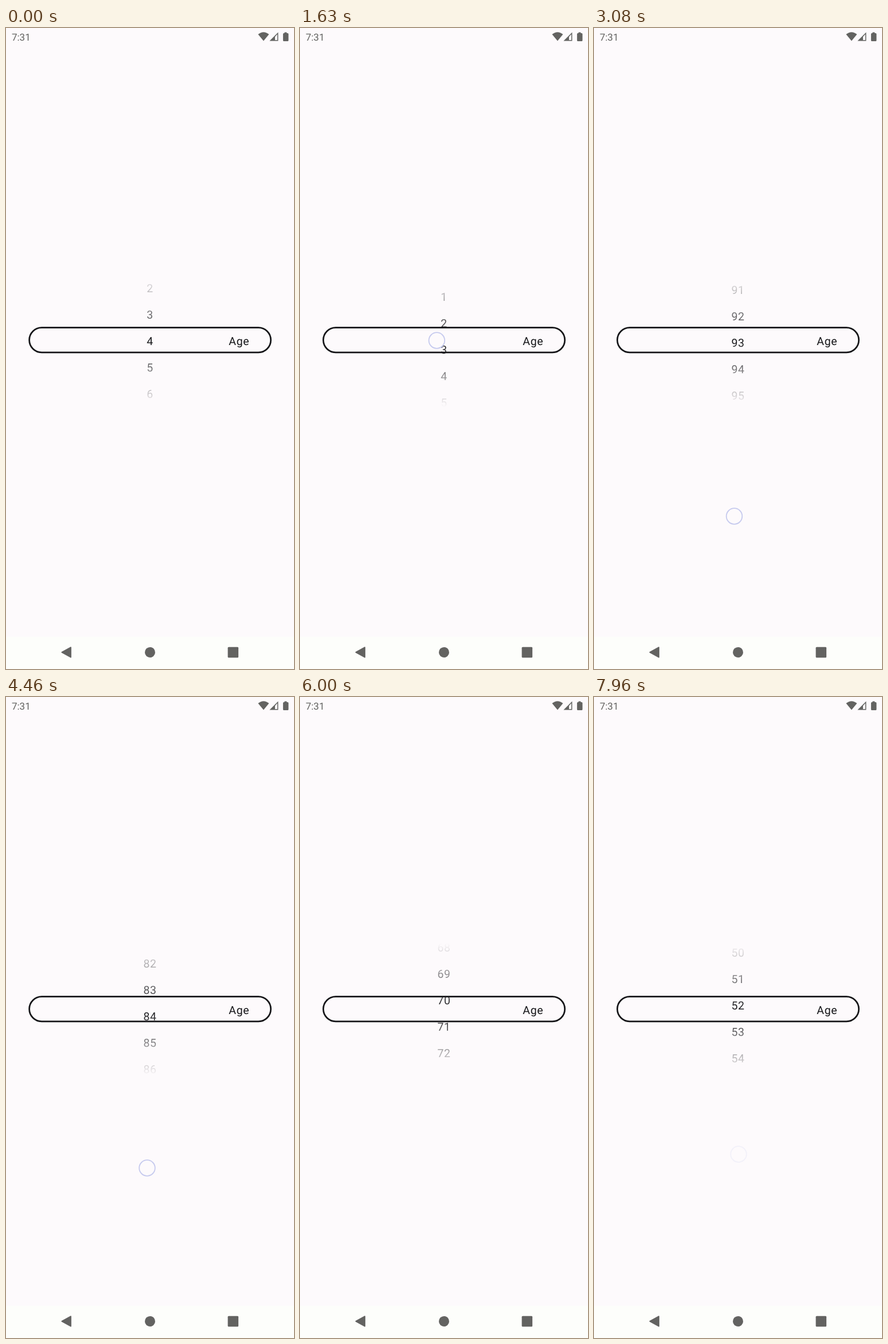
Animation of 502x1116 px, one loop 8000 ms. Source, as an HTML page:

```html
<!DOCTYPE html>
<html lang="en">
<head>
<meta charset="utf-8">
<title>Age picker</title>
<style>
  html, body { margin: 0; width: 100%; height: 100%; overflow: hidden; background: #fdfafc; }
  svg { display: block; width: 502px; height: 1116px; }
  text { font-family: Roboto, sans-serif; text-rendering: geometricPrecision; }
  .body { font-size: 19.5px; letter-spacing: .61px; fill: #151518; }
  .icons { fill: #636361; }
</style>
</head>
<body>
<svg viewBox="0 0 502 1116">
  <defs>
    <linearGradient id="fade" gradientUnits="userSpaceOnUse" x1="0" y1="429" x2="0" y2="660">
      <stop offset="0" stop-color="#fff" stop-opacity="0"/>
      <stop offset=".5" stop-color="#fff"/>
      <stop offset="1" stop-color="#fff" stop-opacity="0"/>
    </linearGradient>
    <mask id="window" maskUnits="userSpaceOnUse" x="0" y="429" width="502" height="231">
      <rect y="429" width="502" height="231" fill="url(#fade)"/>
    </mask>
  </defs>

  <rect y="1060" width="502" height="56" fill="#fdfefb"/>

  <g class="icons" transform="translate(.4 .4)">
    <text x="9.500" y="21.200" font-size="17">7:31</text>
    <path d="M448.500 22 439 10.600Q448.500 3 458 10.600Z"/>
    <path fill-rule="evenodd" d="M459 22 474 7V22ZM468.500 14.800V20.500H472.500V10.700Z"/>
    <path d="M485 8.500V7H489V8.500H490.500Q492 8.500 492 10V21Q492 22.500 490.500 22.500H484Q482.500 22.500 482.500 21V10Q482.500 8.500 484 8.500Z"/>
    <path d="M97 1086.500 112.500 1078V1095Z" stroke="#636361" stroke-width="2" stroke-linejoin="round"/>
    <circle cx="250.600" cy="1086.500" r="9"/>
    <rect x="386.200" y="1077.300" width="18.500" height="18.500" rx="1.500"/>
  </g>

  <g id="wheel" class="body" text-anchor="middle" mask="url(#window)"></g>
  <rect x="40.600" y="521.700" width="421" height="43.200" rx="21.600" fill="none" stroke="#151518" stroke-width="2.700"/>
  <text class="body" x="388.300" y="551.500">Age</text>
  <circle id="touch" r="13.800" fill="none" stroke="#c6caee" stroke-width="1.800"/>
</svg>
<script>
  const LOOP = 8000, GLIDE = 500, FADE = 200;
  const ROW = 46, BASELINE = 551.5, COUNT = 100, START = 4;

  // Each swipe drags the wheel with the finger, then it glides to rest on a whole row.
  const swipes = [
    { press: 1300, release: 1630, x: 238.4, from: 483, to: 544, rest: 1 },
    { press: 2500, release: 3080, x: 244.5, from: 479, to: 850, rest: -9 },
    { press: 3850, release: 4460, x: 246, from: 487, to: 820, rest: -20 },
    { press: 5200, release: 5700, x: 247, from: 483, to: 837, rest: -30 },
    { press: 6260, release: 6780, x: 249, from: 480, to: 863, rest: -42 },
    { press: 7340, release: 7800, x: 252, from: 537, to: 796, rest: -48 }
  ];

  const touch = document.getElementById('touch');
  const wheel = document.getElementById('wheel');
  const rows = Array.from({ length: 7 }, () => {
    const row = document.createElementNS('http://www.w3.org/2000/svg', 'text');
    row.setAttribute('x', 251);
    return wheel.appendChild(row);
  });

  const clamp = n => Math.min(1, Math.max(0, n));
  const mix = (a, b, k) => a + (b - a) * k;
  const easeOut = k => 1 - (1 - k) ** 2;

  function fingerY(swipe, t) {
    const { press, release, from, to } = swipe;
    return mix(from, to, clamp((t - press) / (release - press)));
  }

  function wheelPosition(t, index) {
    if (index < 0) return START;
    const swipe = swipes[index];
    const origin = index ? swipes[index - 1].rest : START;
    const dragged = origin - (fingerY(swipe, t) - swipe.from) / ROW;
    return mix(dragged, swipe.rest, easeOut(clamp((t - swipe.release) / GLIDE)));
  }

  function drawWheel(position) {
    const first = Math.round(position) - 3;
    rows.forEach((row, k) => {
      const n = first + k;
      row.textContent = (n % COUNT + COUNT) % COUNT;
      row.setAttribute('y', BASELINE + ROW * (n - position));
    });
  }

  function drawTouch(t, swipe) {
    touch.setAttribute('opacity', swipe ? 1 - clamp((t - swipe.release) / FADE) : 0);
    if (!swipe) return;
    touch.setAttribute('cx', swipe.x);
    touch.setAttribute('cy', fingerY(swipe, t));
  }

  function frame() {
    const t = performance.now() % LOOP;
    const index = swipes.filter(swipe => swipe.press <= t).length - 1;
    drawWheel(wheelPosition(t, index));
    drawTouch(t, swipes[index]);
    requestAnimationFrame(frame);
  }
  frame();
</script>
</body>
</html>
```
